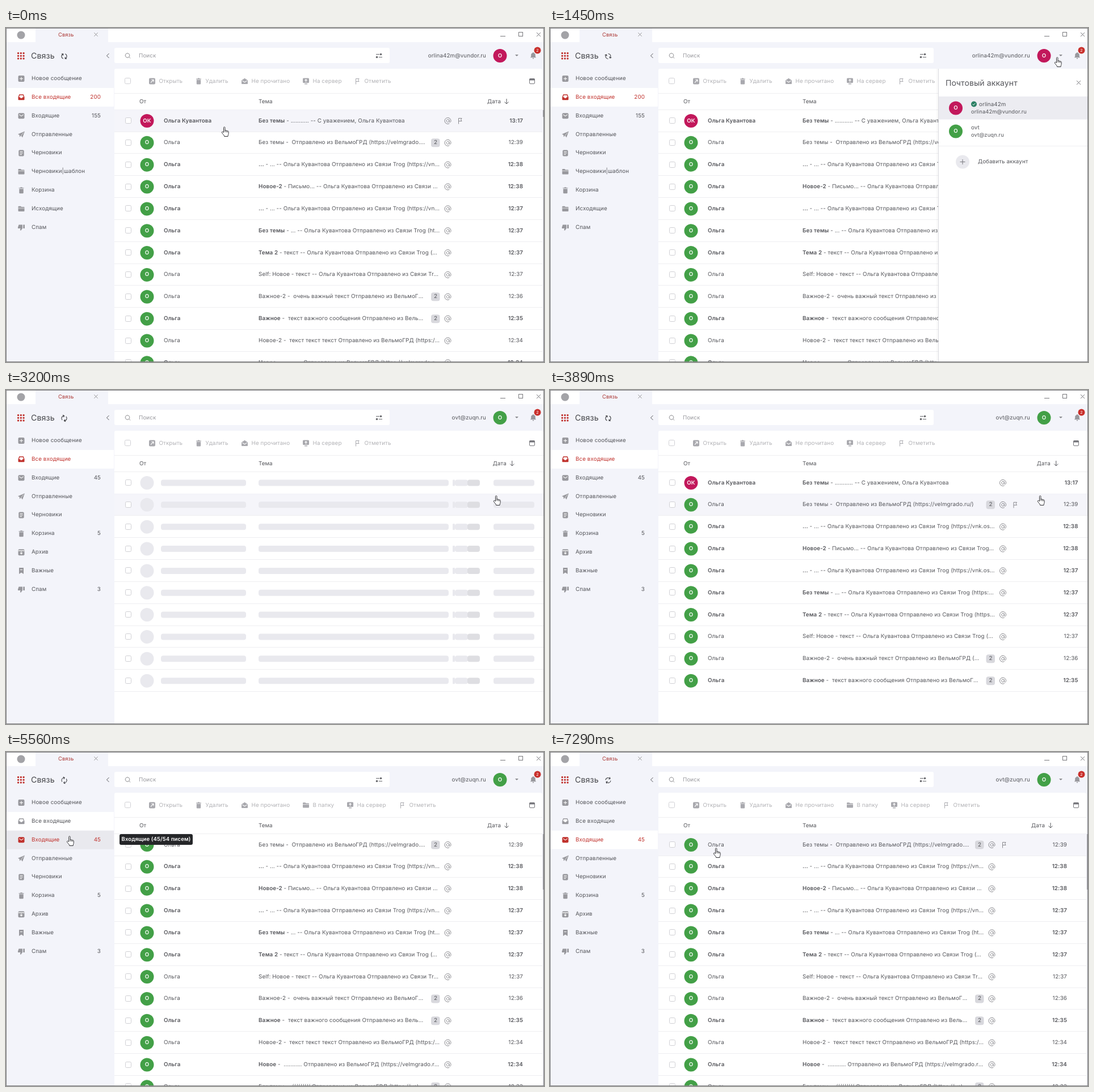
These frames come from a looping animation (948 by 590 pixels, 7360 ms). An HTML page:

```html
<!DOCTYPE html>
<html lang="ru">
<head>
<meta charset="utf-8">
<title>Входящие</title>
<style>
html, body { margin: 0; width: 948px; height: 590px; overflow: hidden; background: #fff; }
body { position: relative; font: 9.8px Inter, sans-serif; letter-spacing: .1px; color: #55565b; text-rendering: geometricPrecision; }
svg { position: absolute; left: 0; top: 0; overflow: visible; }
b { font-weight: 600; }
.t { position: absolute; line-height: 20px; white-space: pre; }
.cut { overflow: hidden; text-overflow: ellipsis; }
.i { fill: currentColor; stroke: none; }
.l { fill: none; stroke: currentColor; stroke-width: 1; }
.w { fill: none; stroke: #fff; stroke-width: 1.1; }
#panel { position: absolute; left: 0; top: 0; width: 948px; height: 590px; }
#clip { position: absolute; left: 0; top: 0; width: 947px; height: 589px; overflow: hidden; }
#frame { position: absolute; inset: 0; border: 1px solid #818184; }
#tip { position: absolute; left: 200px; top: 145px; width: 129px; height: 19px; border-radius: 3px; background: #252629; color: #fff; font: 600 9.6px/19px Inter, sans-serif; text-align: center; white-space: pre; }
</style>
</head>
<body>
<div id="clip"><div id="app"></div><div id="panel"></div></div>
<div id="tip">Входящие (45/54 писем)</div>
<div id="frame"></div>
<svg width="948" height="590"><g id="hand">
  <path fill="#fff" stroke="#303034" stroke-linejoin="round" d="M4 10.5V2.2C4 .2 6.4 .2 6.4 2.2V7.3C6.4 6.2 8.6 6.2 8.6 7.8C8.6 6.9 10.6 7 10.6 8.4C10.6 7.6 12.6 7.8 12.6 9.3V12.5C12.6 14.2 11.5 15 11.5 17.5H5.2C5.2 15.5 3.3 14.3 1 11.2C.2 10 1.6 8.6 2.8 9.6Z"/>
  <path fill="none" stroke="#303034" stroke-width=".8" d="M6.4 7V10M8.6 8V10.3M10.6 8.5V10.5"/>
</g></svg>
<script>
const LOOP = 7360, ROW = 38.85, NAV = 32.86;
const RED = '#c0322d', GREY = '#98989d', GREEN = '#43a047', PINK = '#c2185b', TINT = '#f3f4fa';
const $ = id => document.getElementById(id);

const first = 'Ольга', full = 'Ольга Кувантова', brand = 'Связь';
const accounts = [['orlina42m', 'orlina42m@vundor.ru', PINK], ['ovt', 'ovt@zuqn.ru', GREEN]];
const signed = ` -- ${full} Отправлено из Связи Trog (https://vnk.ostrel.ru/)`;
const sent = ' Отправлено из ВельмоГРД (https://velmgrado.ru/)';

// bold, subject, body, time, count
const mails = [
  [1, 'Без темы', '........... -- С уважением, ' + full, '13:17'],
  [0, 'Без темы', sent, '12:39', 2],
  [1, '...', '...' + signed, '12:38'],
  [1, 'Новое-2', 'Письмо...' + signed, '12:38'],
  [1, '...', '...' + signed, '12:37'],
  [1, 'Без темы', '...' + signed, '12:37'],
  [1, 'Тема 2', 'текст' + signed, '12:37'],
  [0, 'Self: Новое', 'текст' + signed, '12:37'],
  [0, 'Важное-2', ' очень важный текст' + sent, '12:36', 2],
  [1, 'Важное', ' текст важного сообщения' + sent, '12:35', 2],
  [0, 'Новое-2', ' текст текст текст' + sent, '12:34'],
  [1, 'Новое', ' ...........' + sent, '12:34'],
  [0, 'Без темы', ' /////////' + sent, '12:33', 2]
];

const folders = [
  [['add', 'Новое сообщение'], ['inbox', 'Все входящие', 200], ['mail', 'Входящие', 155], ['send', 'Отправленные'], ['draft', 'Черновики'],
   ['folder', 'Черновики|шаблон'], ['trash', 'Корзина'], ['folder', 'Исходящие'], ['spam', 'Спам']],
  [['add', 'Новое сообщение'], ['inbox', 'Все входящие'], ['mail', 'Входящие', 45], ['send', 'Отправленные'], ['draft', 'Черновики'],
   ['trash', 'Корзина', 5], ['archive', 'Архив'], ['mark', 'Важные'], ['spam', 'Спам', 3]]
];

// Positions of discs, icons and text name the middle pixel, hence the halves.
const p = (d, cls = 'i') => `<path class="${cls}" d="${d}"/>`;
const box = (x, y, w, h, fill, r = 0, more = '') => `<rect x="${x}" y="${y}" width="${w}" height="${h}" rx="${r}" fill="${fill}" ${more}/>`;
const disc = (x, y, r, fill) => `<circle cx="${x + .5}" cy="${y + .5}" r="${r}" fill="${fill}"/>`;
const tile = box(-5.5, -5.5, 11, 11, 'currentColor', 2);
const icons = {
  add: tile + p('M0-3V3M-3 0H3', 'w'),
  inbox: p('M-5.5 0L-3.8-5H3.8L5.5 0V4Q5.5 5 4.5 5H-4.5Q-5.5 5-5.5 4Z') + '<path fill="#fff" d="M-4 0L-2.9-3.7H2.9L4 0H2.2L1.2 1.6H-1.2L-2.2 0Z"/>',
  mail: box(-5.5, -5, 11, 10, 'currentColor', 2) + p('M-3.8-2.4L0 .4L3.8-2.4', 'w'),
  send: p('M-6-.5L6-5.5L2 5.5L-.5 2L-3 4.5L-3.2 1Z') + '<path class="w" style="stroke-width:.7" d="M-.5 2L4-3.5"/>',
  draft: box(-4.7, -5.5, 9.4, 11, 'currentColor', 2) + p('M-2.5-2.5H2.5M-2.5 0H2.5M-2.5 2.5H1', 'w'),
  folder: p('M-5.5-3.8Q-5.5-4.8-4.5-4.8H-1.2L.3-3.4H4.5Q5.5-3.4 5.5-2.4V3.6Q5.5 4.6 4.5 4.6H-4.5Q-5.5 4.6-5.5 3.6Z') + '<path class="w" style="stroke-width:.7" d="M-5.5-1.4H5.5"/>',
  trash: p('M-4.4-4.5H-2L-1.4-5.5H1.4L2-4.5H4.4V-3.3H-4.4ZM-3.7-2.5H3.7V4.3Q3.7 5.5 2.5 5.5H-2.5Q-3.7 5.5-3.7 4.3Z'),
  archive: tile + p('M-5.5-2.8H5.5M0-1.5V3M-2 1L0 3L2 1', 'w'),
  mark: p('M-4-5.5H4V5.5L0 3L-4 5.5Z') + p('M-2-2H2', 'w'),
  spam: p('M-4.5-5H2V1.5L-1 5.5L-2.2 4.4L-1.5 1.5H-6V-.5ZM3.2-5H6V1.5H3.2Z'),
  open: tile + p('M-2.5 2.5L2.3-2.3M-1.2-2.5H2.5V1.2', 'w'),
  read: p('M-5.5-1.5L0-5.3L5.5-1.5V4Q5.5 5 4.5 5H-4.5Q-5.5 5-5.5 4Z') + p('M-4.2-.9L0 1.8L4.2-.9', 'w'),
  server: box(-5.5, -5.5, 11, 8.6, 'currentColor', 1.5) + p('M-2.5 4H2.5V5.4H-2.5Z') + p('M0 1.5V-3M-2-1.2L0-3.2L2-1.2', 'w'),
  flag: p('M-3 5.5V-4.5H2.6L1-2L2.6 .5H-3', 'l'),
  at: p('M2.4-2.4V.8C2.4 3.2 5.5 3 5.5 0A5.5 5.5 0 1 0 2.8 4.7M2.4 0A2.4 2.4 0 1 1 2.4-.1', 'l'),
  table: box(-4.5, -4.5, 9, 9, 'none', 1.5, 'stroke="currentColor"') + p('M-4.5-4.5H4.5V-1.5H-4.5Z'),
  cross: p('M-3.5-3.5L3.5 3.5M3.5-3.5L-3.5 3.5', 'l'),
  bell: p('M-5.2 3.2L-3.8 1.5V-1.2C-3.8-3.6-2.5-4.6-1-5A1 1 0 0 1 1-5C2.5-4.6 3.8-3.6 3.8-1.2V1.5L5.2 3.2ZM-1.4 4H1.4Q1 5.7 0 5.7Q-1 5.7-1.4 4Z'),
  sync: p('M-1.8 4.2A4.4 4.4 0 0 1-2.2-3.8M1.8-4.2A4.4 4.4 0 0 1 2.2 3.8M-4.6-4.2H-1.7V-1.3M4.6 4.2H1.7V1.3', 'l'),
  gear: Array.from({ length: 4 }, (_, k) => box(-1.3, -5.5, 2.6, 11, 'currentColor', .6, `transform="rotate(${k * 45})"`)).join('') + disc(-.5, -.5, 4.1, 'currentColor') + disc(-.5, -.5, 1.8, '#fff'),
  tick: '<path class="w" style="stroke-width:1.6" d="M-4 .2L-1.3 2.8L4-2.8"/>',
  find: p('M2.6 2.6L5 5M3.8 0A3.8 3.8 0 1 1 3.8-.1', 'l'),
  tune: p('M-5-2H1M0 3H6', 'l') + disc(3, -2.5, 1.8, 'currentColor') + disc(-4, 2.5, 1.8, 'currentColor'),
  back: p('M2-4L-2 0L2 4', 'l'),
  down: p('M-3-1.5H3L0 1.5Z'),
  plus: p('M0-4.5V4.5M-4.5 0H4.5', 'l'),
  arrow: p('M0-4.5V4.5M-3.5 1L0 4.5L3.5 1', 'l')
};
const icon = (name, x, y, color = GREY, more = '') => `<g transform="translate(${x + .5} ${y + .5})" style="color:${color}"><g ${more}>${icons[name]}</g></g>`;
const svg = s => `<svg width="948" height="590">${s}</svg>`;
const line = (x1, x2, y) => box(x1, y, x2 - x1, 1, '#eeeef1');
const check = (x, y) => box(x - 4.5, Math.round(y) - 4.5, 10, 10, '#fff', 2, 'stroke="#d0d0d4"');

// y is the middle of the capitals
const text = (x, y, s, css = '', cls = '') => `<div class="t ${cls}" style="left:${x}px;top:${y - 9}px;${css}">${s}</div>`;
const right = (x, y, s, css = '') => `<div class="t" style="right:${947 - x}px;top:${y - 9}px;${css}">${s}</div>`;
const mid = (x, y, s, css = '') => text(x - 19.5, y, s, 'width:40px;text-align:center;' + css);
const letter = (x, y, s) => mid(x, y, s, 'color:#fff;font-weight:600;font-size:9.6px');

function chrome(user) {
  let s = box(0, 25, 948, 565, TINT) + box(52, 0, 128, 26, TINT) + disc(26, 12, 7, '#a3a3a7');
  s += icon('cross', 158, 11, '#88888c', 'transform="scale(.9)"') + icon('cross', 938, 11, '#77777b');
  s += box(871, 14, 9, 1, '#77777b') + box(903.5, 7.5, 7, 7, 'none', 0, 'stroke="#77777b"');
  for (let k = 0; k < 9; k++) s += box(20 + k % 3 * 4.8, 43 + (k / 3 | 0) * 4.8, 3, 3, RED, .8);
  s += icon('sync', 102, 49.5, '#35363a', 'id="spin"') + icon('back', 179, 48.5, '#55565b');
  s += box(191, 35, 485, 27, '#fff', 3) + icon('find', 213.5, 48, '#88888c') + icon('tune', 656.5, 48, '#66676b');
  s += disc(870, 48.5, 12, accounts[user][2]) + icon('down', 899.5, 48, '#88888c');
  s += icon('bell', 928.5, 48.5) + disc(936, 39, 6, '#c9302c');
  return svg(s) + text(92, 12, brand, 'font-size:9.3px;color:#ab3430') + text(44, 49, brand, 'font-size:14.2px;color:#45464a')
    + text(234, 48.5, 'Поиск', 'color:#98989d') + right(846, 49, accounts[user][1])
    + letter(870, 49, 'О') + mid(936, 39, '2', 'color:#fff;font-size:7px');
}

function sidebar(user, selected, hover, fading) {
  let s = '', labels = '';
  folders[user].forEach(([name, label, count], k) => {
    const y = 89 + k * NAV, color = k === selected ? RED : '';
    if (k === selected || k === hover || fading && k === 1)
      s += box(0, y + .5 - NAV / 2, 190, NAV, k === hover ? '#e9e9ee' : '#fff');
    s += icon(name, 26.5, y, color || GREY);
    labels += text(45, y, label, `color:${color}`) + right(167, y, count || '', `color:${color}`);
  });
  return svg(s) + labels;
}

function content(mode, hover) {
  const wide = mode === 'all' || mode === 'wait', edge = wide ? 947 : 945, shift = wide ? 19.5 : 0;
  let s = box(191, 72, edge - 191, 518, '#fff', 3) + line(191, edge, 115) + line(191, edge, 144), labels = '';
  const tools = [['open', 257, 'Открыть'], ['trash', 339, 'Удалить'], ['read', 420, 'Не прочитано']];
  tools.push(...(mode === 'inbox'
    ? [['folder', 528, 'В папку'], ['server', 606, 'На сервер'], ['flag', 698, 'Отметить']]
    : [['server', 528, 'На сервер'], ['flag', 619, 'Отметить']]));
  s += check(214, 93) + icon('table', 926.5, 93.5, '#77777c');
  for (const [name, x, label] of tools) {
    s += icon(name, x, 93.5, '#a9a9ae');
    labels += text(x + 12.5, 93.5, label, 'color:#b2b2b6');
  }
  const dateX = 848 + shift / 2;
  s += icon('arrow', dateX + 33.5, 129, '#55565b');
  labels += text(235, 129.5, 'От') + text(445, 129.5, 'Тема') + text(dateX, 129.5, 'Дата');
  const list = mode === 'inbox' ? mails.slice(1) : mails.slice(0, wide ? 10 : 12);
  list.forEach(([bold, subject, body, time, count], k) => {
    const y = 163.5 + k * ROW, weight = bold ? 'font-weight:600' : '', lead = mode !== 'inbox' && k === 0;
    if (k === hover) s += box(191, y - 19, edge - 191, ROW, '#f5f5fa');
    s += line(191, edge, Math.round(y + 19)) + check(215, y - .5);
    if (mode === 'wait') {
      s += disc(248, y, 12, '#e9e9ee');
      for (const [x, w, c] of [[273, 150], [445, 335], [787, 4], [791, 23], [813, 22, '#dedee2'], [859, 72]])
        s += box(x, y - 5, w, 11, c || '#e9e9ee', w < 9 ? 1 : 4);
      return;
    }
    s += disc(248, y, 12, lead ? PINK : GREEN) + icon('at', 778 + shift, y, '#88888d');
    if (count) {
      s += box(749 + shift, y - 7, 15.5, 15, '#d8d8dd', 4);
      labels += mid(756.5 + shift, y, count);
    }
    if (k === hover) s += icon('flag', 800 + shift, y, '#88888d');
    const width = (count ? 741 : 765) - 445 + shift;
    labels += letter(248, y, lead ? 'ОК' : 'О') + text(278, y, lead ? full : first, weight)
      + text(445, y, (bold ? `<b>${subject}</b>` : subject) + ' - ' + body, `width:${width}px`, 'cut')
      + right(911 + shift, y, time, weight);
  });
  if (!wide) s += box(946, 145, 2, mode === 'inbox' ? 98 : 12, '#a5a5aa');
  return svg(s) + labels;
}

function drawer(hover) {
  let s = box(681, 72, 4, 518, '#00000006') + box(684, 72, 1, 518, '#dcdce1') + box(685, 72, 263, 518, '#fff');
  s += icon('cross', 931, 96, '#77777c') + box(685, 121, 263, 40.5, '#ececf1');
  if (hover) s += box(685, 161.5, 263, 41, '#f9f9fc') + icon('gear', 926.5, 182);
  s += disc(714.5, 141, 12, PINK) + disc(714.5, 182, 12, hover ? '#3c3d41' : GREEN);
  if (hover) s += icon('tick', 714.5, 182);
  s += disc(746.5, 134, 5, '#2b8064') + icon('tick', 746.5, 134, '', 'transform="scale(.6)"');
  s += line(685, 948, 208) + disc(726.5, 236, 12, '#e9e9ee') + icon('plus', 726.5, 236, '#77777c');
  const [[a, aMail], [b, bMail]] = accounts, small = 'font-size:9.4px';
  return svg(s) + text(697, 96.5, 'Почтовый аккаунт', 'font-size:14px') + letter(714.5, 141, 'О') + (hover ? '' : letter(714.5, 182, 'О'))
    + text(756, 135, a) + text(742, 148, aMail, small) + text(742, 176, b) + text(742, 189, bMail, small)
    + text(754, 236, 'Добавить аккаунт');
}

// time, x, y of the pointer's middle
const path = [
  [0, 386, 183], [70, 386, 183], [300, 570, 138], [630, 905, 46], [760, 900, 54], [900, 895, 60],
  [1590, 895, 60], [1850, 888, 120], [2180, 867, 201], [2350, 865, 195], [3960, 865, 195],
  [4350, 710, 214], [4660, 560, 205], [4900, 330, 192], [5150, 67, 165], [5400, 113, 157],
  [6300, 114, 157], [6600, 210, 174], [6850, 302, 182], [7010, 319, 180], [7220, 294, 178], [LOOP, 294, 178]
];
function pointer(t) {
  const k = path.findIndex(q => q[0] > t), [t0, x0, y0] = path[k - 1], [t1, x1, y1] = path[k];
  const f = (t - t0) / (t1 - t0);
  return [x0 + (x1 - x0) * f, y0 + (y1 - y0) * f];
}

let shown = '';
function draw(now) {
  const t = Math.max(0, now) % LOOP, [x, y] = pointer(t), tipY = y - 8;
  const mode = t < 3200 ? 'own' : t < 3550 ? 'wait' : t < 5500 ? 'all' : 'inbox';
  const user = t < 3200 ? 0 : 1, opened = t >= 1000 && t < 3200;
  const row = x > 191 && tipY > 144 && !opened ? Math.floor((tipY - 144) / ROW) : -1;
  const nav = x < 190 ? Math.round((tipY - 89) / NAV) : -1;
  const pick = opened && tipY > 161.5 && tipY < 203, fading = mode === 'inbox' && t < 5640;
  const key = [mode, row, nav, pick, fading].join();
  if (key !== shown) {
    shown = key;
    $('app').innerHTML = chrome(user) + sidebar(user, mode === 'inbox' ? 2 : 1, nav, fading) + content(mode, row);
    $('panel').innerHTML = drawer(pick);
  }
  const slide = Math.max(0, 1 - (t - 1000) / 220) ** 3;
  $('panel').style.display = opened ? '' : 'none';
  $('panel').style.transform = slide ? `translateX(${slide * 263}px)` : '';
  $('tip').style.display = t >= 5200 && t < 6600 ? '' : 'none';
  const spin = t > 2980 && t < 3200 ? 2980 : t;
  $('spin').setAttribute('transform', `rotate(${spin / 1550 * 360})`);
  $('hand').setAttribute('transform', `translate(${x - 6.5} ${y - 9})`);
  requestAnimationFrame(draw);
}
draw(0);
</script>
</body>
</html>
```
